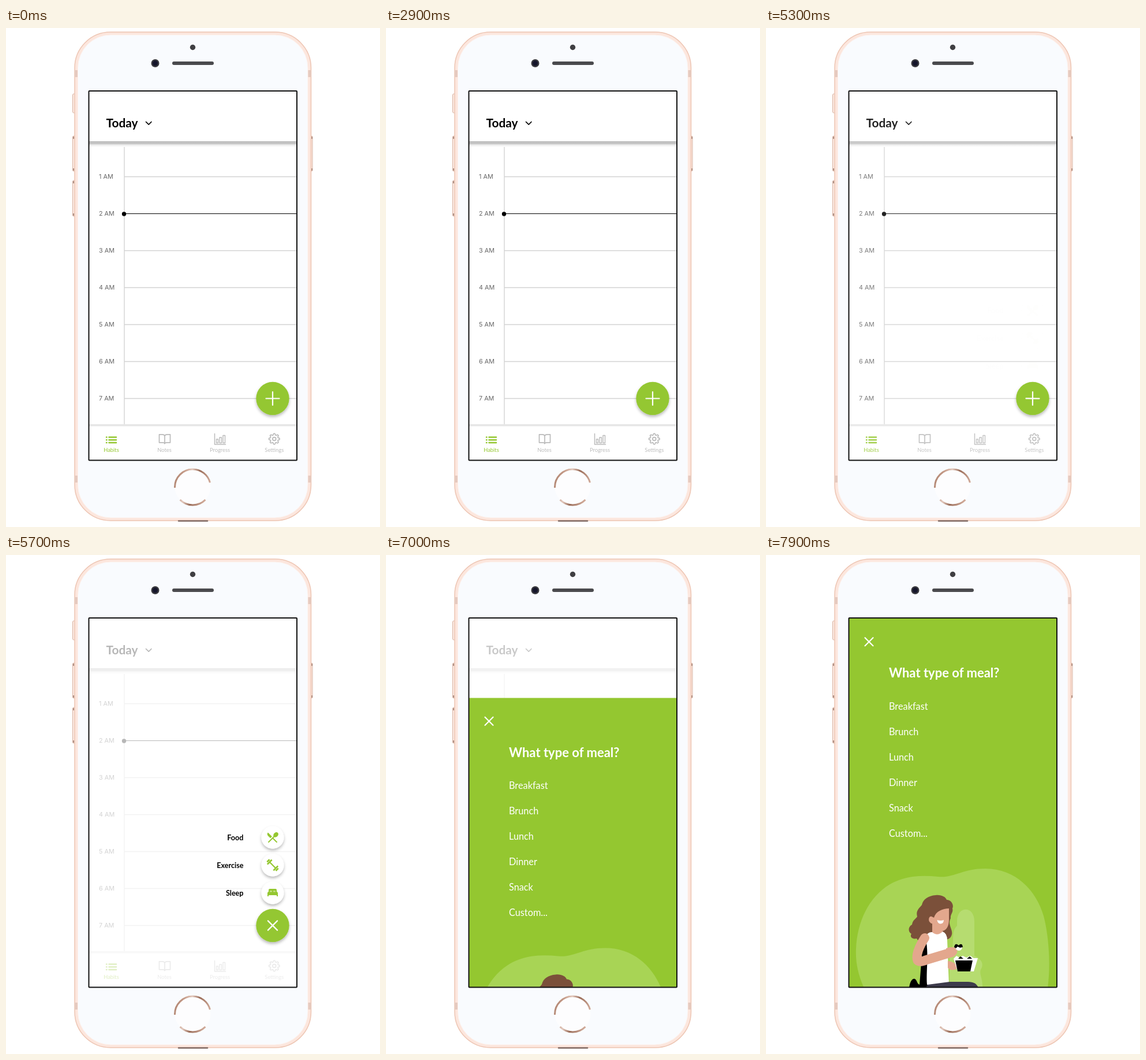
Write an HTML page that moves like this. It is 648 px wide and 864 px high and loops after 8 s.

```html
<!DOCTYPE html>
<html lang="en">
<head>
<meta charset="utf-8">
<title>Habit planner</title>
<style>
html, body { margin: 0; width: 100%; height: 100%; overflow: hidden; background: #fff; }
svg { display: block; width: 648px; height: 864px; font-family: Lato, "Open Sans", sans-serif; }
.line { fill: none; stroke-linecap: round; stroke-linejoin: round; }
.hour { font: 10.8px Inter, sans-serif; fill: #666; }
.nav text { font-size: 9.4px; text-anchor: middle; }
.menu text { font-size: 12.6px; font-weight: 700; text-anchor: end; }
.meals { font-size: 16.3px; fill: #fff; }
</style>
</head>
<body>
<svg viewBox="0 0 648 864">
  <defs>
    <clipPath id="screen"><rect x="143.500" y="109" width="360.500" height="639.500"/></clipPath>
    <linearGradient id="under" x2="0" y2="1">
      <stop stop-color="#bdbdbd"/><stop offset=".45" stop-color="#c6c6c6"/>
      <stop offset=".6" stop-color="#e9e9e9"/><stop offset="1" stop-color="#fff"/>
    </linearGradient>
    <linearGradient id="copper" x2="1" y2=".3">
      <stop stop-color="#a97d6a"/><stop offset=".25" stop-color="#c49a87"/><stop offset=".45" stop-color="#e3c9bd"/>
      <stop offset=".65" stop-color="#9a6c58"/><stop offset="1" stop-color="#d0aa99"/>
    </linearGradient>
    <filter id="shadow" x="-30%" y="-30%" width="160%" height="170%">
      <feDropShadow dx="0" dy="3" stdDeviation="2.500" flood-opacity=".28"/>
    </filter>
  </defs>

  <!-- phone -->
  <g fill="#fbe9e1" stroke="#d9b3a2">
    <rect x="115.500" y="114" width="5" height="33" rx="2"/>
    <rect x="115.500" y="187" width="5" height="61" rx="2"/>
    <rect x="115.500" y="264" width="5" height="62" rx="2"/>
    <rect x="526" y="187" width="5" height="61" rx="2"/>
  </g>
  <path d="M117 188v4M117 243v4M117 265v4M117 321v4M530 188v4M530 243v4" stroke="#96756a" stroke-width="1.500"/>
  <rect x="119" y="7" width="409.500" height="846" rx="62" fill="#fce6dd" stroke="#edc5b3" stroke-width="1.500"/>
  <rect x="124.500" y="12" width="398.500" height="836" rx="57" fill="#f9fbfe" stroke="#fdf1ec"/>
  <path d="M121.500 73v12M121.500 775v12M526 73v12M526 775v12" stroke="#e6cabf" stroke-width="5"/>
  <path d="M299 853.500h50" stroke="#806a63" stroke-width="2.500" stroke-linecap="round"/>
  <circle cx="323.500" cy="33.500" r="4.700" fill="#3f3f42"/>
  <circle cx="258.500" cy="61" r="7" fill="#38383d"/>
  <circle cx="258.500" cy="61" r="4.500" fill="#15152b"/>
  <rect x="288" y="58" width="72" height="6" rx="3" fill="#4a4a4d"/>
  <circle cx="323.500" cy="795" r="31" fill="#fdfdfe"/>
  <circle cx="323.500" cy="795" r="31" fill="none" stroke="url(#copper)" stroke-width="3" pathLength="360" stroke-dasharray="0 45 90 43 167 15"/>

  <g clip-path="url(#screen)">
    <rect x="143" y="109" width="361" height="640" fill="#fff"/>
    <path d="M205 200v488" stroke="#d0d0d0" stroke-width="1.300"/>
    <g id="hours"></g>
    <rect x="144" y="196" width="360" height="10" fill="url(#under)"/>
    <path d="M205 321.500h299" stroke="#111" stroke-width="1.200"/>
    <circle cx="204.500" cy="322" r="3.700"/>
    <text x="173.500" y="172" font-size="20.800" font-weight="700">Today</text>
    <path class="line" d="M242.500 162.500l4.700 4.700 4.700-4.700" stroke="#000" stroke-width="1.700"/>

    <!-- tab bar -->
    <rect x="144" y="686" width="360" height="64" fill="#e6e6e6"/>
    <rect x="144" y="689.500" width="360" height="60" fill="#fff"/>
    <g class="nav" fill="#bdbdbd">
      <g fill="#94c730">
        <path class="line" d="M178.500 708.500h12.500M178.500 713.200h12.500M178.500 718h12.500M174 708.500h.5M174 713.200h.5M174 718h.5" stroke="#94c730" stroke-width="2.500"/>
        <text x="182.500" y="734">Habits</text>
      </g>
      <g class="line" stroke="#bababa" stroke-width="1.700">
        <path d="M275 706.500c-.6-2-2-2.700-4-2.700h-5.500v14h6.500c1.700 0 2.600.6 3 2 .4-1.400 1.300-2 3-2h6.500v-14h-5.500c-2 0-3.400.7-4 2.700v13"/>
        <path d="M361.500 702.500v18.500h19" stroke-width="1.500"/>
        <path d="M364.500 712h3v6.500h-3zM370 709h3.500v9.500h-3.500zM376 705.500h3.500v13h-3.500z" stroke-width="1.400"/>
        <path id="gear"/>
        <circle cx="464.800" cy="711.500" r="2.900"/>
      </g>
      <text x="274.500" y="734">Notes</text>
      <text x="370.500" y="734">Progress</text>
      <text x="464.800" y="734">Settings</text>
    </g>

    <rect id="veil" x="144" y="109" width="360" height="640" fill="#fff"/>

    <g class="menu" id="menu">
      <g fill="#fff" filter="url(#shadow)">
        <circle cx="462" cy="489" r="19.500"/><circle cx="462" cy="537" r="19.500"/><circle cx="462" cy="585" r="19.500"/>
      </g>
      <text x="411.500" y="493.500">Food</text>
      <text x="411.500" y="541.500">Exercise</text>
      <text x="411.500" y="589.500">Sleep</text>
      <g fill="#94c730">
        <path transform="translate(450 477)" d="M8.100 13.300l2.800-2.800-7-7c-1.600 1.600-1.600 4.100 0 5.700zM14.900 11.500c1.500.7 3.700.2 5.300-1.400 1.900-1.900 2.300-4.600.8-6.100s-4.200-1.100-6.100.8c-1.600 1.600-2.100 3.800-1.400 5.300L3.700 19.900l1.400 1.400L12 14.400l6.900 6.900 1.400-1.400-6.900-6.900z"/>
        <path transform="translate(462 537) rotate(45)" d="M-7 0h14" stroke="#94c730" stroke-width="2.200"/>
        <path transform="translate(462 537) rotate(45)" d="M-7.500-5.500v11M7.500-5.500v11M-10.700-3v6M10.700-3v6" stroke="#94c730" stroke-width="2.700"/>
        <path d="M455 583v-3q0-2 2-2h10q2 0 2 2v3q2 .3 2 2.500v5.500h-2v-2h-14v2h-2v-5.500q0-2.200 2-2.500z"/>
        <path d="M457 583.500v-2.300h4v2.300zM463 583.500v-2.300h4v2.300z" fill="#c4e088"/>
      </g>
    </g>

    <circle cx="462" cy="641.500" r="28.700" fill="#94c730" filter="url(#shadow)"/>
    <path id="plus" class="line" d="M-11.500 0h23M0-11.500v23" stroke="#fff" stroke-width="2.200"/>

    <!-- meal sheet, drawn in its resting place -->
    <g id="sheet">
      <rect x="143" y="110" width="362" height="640" fill="#94c730"/>
      <path class="line" d="M171.500 143.200l14 14M185.500 143.200l-14 14" stroke="#fff" stroke-width="2.200"/>
      <text x="213" y="212" font-size="22" font-weight="700" fill="#fff">What type of meal?</text>
      <g class="meals" id="meals"></g>

      <path fill="#a8d455" d="M170 750C159 725 155 705 156 682C158 635 178 592 215 570C242 555 270 554 298 557C325 560 340 543 380 543C432 543 468 580 481 625C489 655 494 705 488 750z"/>
      <path fill="#b6dc70" d="M331 634C331 607 361 607 361 634V694C374 700 378 708 372 718C369 726 376 734 375 750H318V690C330 672 318 655 331 642z"/>

      <path fill="#7b503a" d="M294 589C304 588 311 592 313 597C321 597 326 606 323 612C325 619 319 622 320 629C314 640 324 648 322 657C319 668 309 667 304 662L280 662C275 669 264 671 261 664C252 666 249 660 252 656C245 652 247 643 253 640C254 632 259 631 262 626C259 616 266 611 270 606C272 596 281 590 294 589z"/>
      <path fill="#e3a78d" d="M287 626C283 624 280 632 284 636Q287 639 288 638V657Q298 666 306 655V651C314 649 317 641 317 631V612C306 612 294 617 291 628z"/>
      <path fill="#fff" d="M296.500 632q6 2 11.500 0q-.5 7-6 6.500q-4.500-.5-5.500-6.500z"/>

      <path d="M248 750C249 740 253 732 258 734C262 736 261 742 266 744L272 668H284V750z"/>
      <path fill="#fff" d="M276 661Q281 652 288 653Q297 661 306 652Q314 655 314 667L317 744H279C277 720 283 690 276 661z"/>
      <path fill="#3d3b4b" d="M276 750L280 744L318 739H350Q365 739 368 750z"/>
      <path fill="#e3a78d" d="M315 703Q325 704 330 710V717Q321 721 315 715z"/>
      <path fill="#fff" d="M325 699l5-5 5 3 6-3 6 3 7-3 6 4h7l-7 23h-28z"/>
      <path d="M328 702h30l-4 19h-22zM333 699l4-4 5 4zM348 699l5-4 4 4z"/>
      <path class="line" d="M275 663C266 677 259 693 262.500 702Q266 706 278 701L318 689" stroke="#e3a78d" stroke-width="16"/>
      <path fill="#e3a78d" d="M312 681Q322 677 331 681Q334 690 324 696L312 698z"/>
      <path fill="#fff" d="M327 678h13q0 7-6 7-5 0-7-7z"/>
      <path d="M326 679q1-6 5-5l3 2q3-4 6-1l1 4-5 1-4-2-3 3z"/>
    </g>
  </g>
  <rect x="143.500" y="109" width="360.500" height="639.500" rx="1" fill="none" stroke="#111" stroke-width="2"/>
</svg>
<script>
const LOOP = 8000;
const $ = id => document.getElementById(id);

$('hours').innerHTML = [1, 2, 3, 4, 5, 6, 7].map(h => {
  const y = 193.5 + 64 * h;
  return `<path d="M205 ${y}h299" stroke="#d2d2d2" stroke-width="1.5"/>
    <text class="hour" x="161" y="${y + 3.8}">${h} AM</text>`;
}).join('');

$('meals').innerHTML = ['Breakfast', 'Brunch', 'Lunch', 'Dinner', 'Snack', 'Custom...']
  .map((meal, i) => `<text x="213" y="${267.7 + 44 * i}">${meal}</text>`).join('');

// Eight soft teeth around the settings icon.
$('gear').setAttribute('d', 'M' + Array.from({ length: 96 }, (_, i) => {
  const a = i / 96 * 2 * Math.PI;
  const r = 8.1 + 1.2 * Math.tanh(2.5 * Math.cos(8 * a));
  return `${(464.8 + r * Math.cos(a)).toFixed(2)} ${(711.5 + r * Math.sin(a)).toFixed(2)}`;
}).join('L') + 'z');

const progress = (t, start, length) => Math.min(1, Math.max(0, (t - start) / length));
const easeOut = p => 1 - (1 - p) ** 3;
const easeInOut = p => p < 0.5 ? 8 * p ** 4 : 1 - 8 * (1 - p) ** 4;

function draw() {
  const t = performance.now() % LOOP;
  const open = easeInOut(progress(t, 5230, 440));
  const slide = easeInOut(progress(t, 6738, 442));
  $('veil').setAttribute('opacity', 0.79 * easeOut(progress(t, 5250, 820)));
  $('menu').setAttribute('opacity', open);
  $('plus').setAttribute('transform', `translate(462 641.5) rotate(${45 * open})`);
  $('sheet').setAttribute('transform', `translate(0 ${639 * (1 - slide)})`);
  requestAnimationFrame(draw);
}
draw();
</script>
</body>
</html>
```
